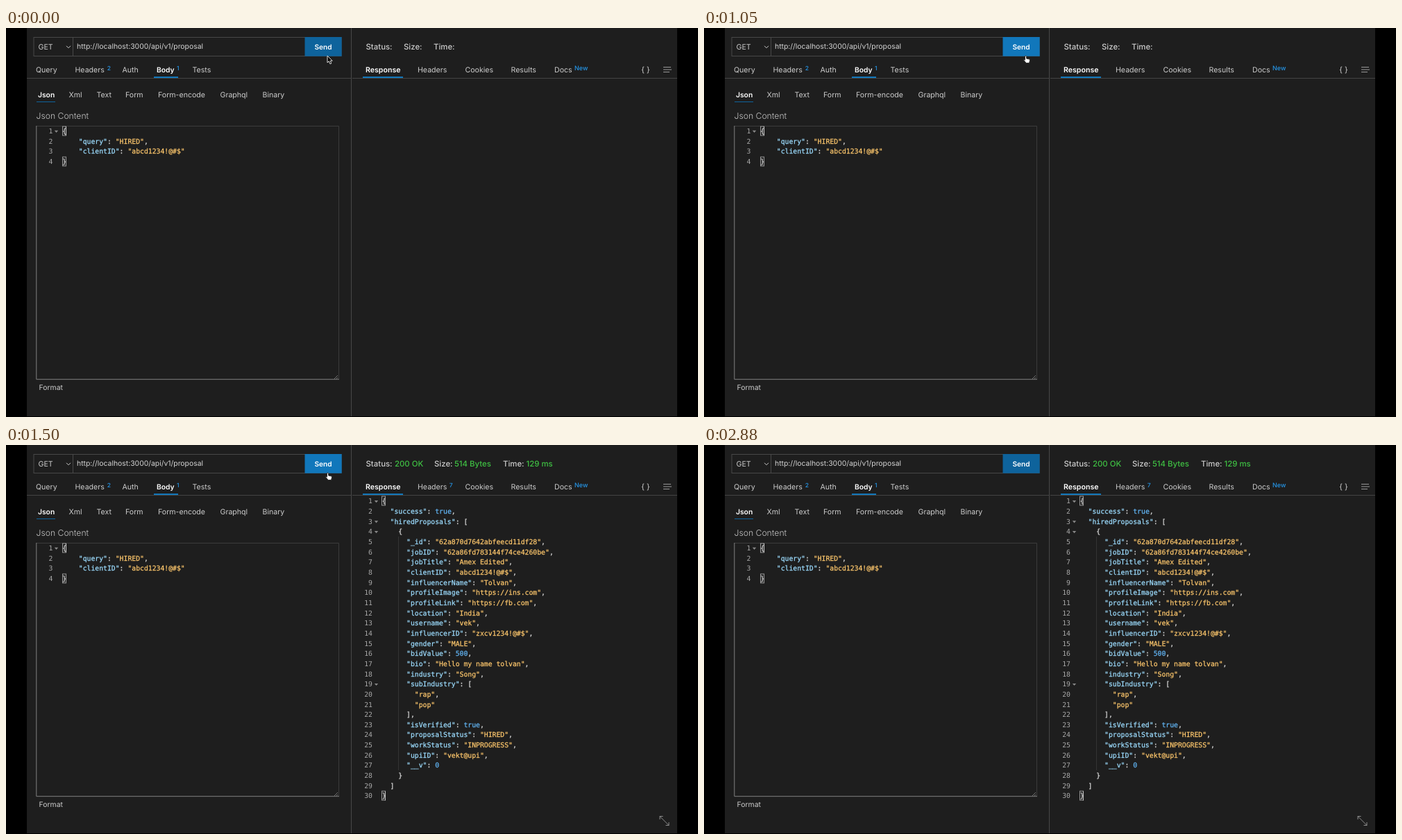
These frames come from a looping animation (997x561 px, 3.33 s). An HTML page with a canvas:

```html
<!DOCTYPE html>
<html lang="en">
<head>
<meta charset="utf-8">
<title>API client</title>
<style>
  html, body { margin: 0; height: 100%; overflow: hidden; background: #000; }
  canvas { display: block; }
</style>
</head>
<body>
<canvas id="stage" width="997" height="561"></canvas>
<script>
const ctx = document.getElementById('stage').getContext('2d');
const LOOP = 3330, HOVER = 810, SEND = 1080, REPLY = 1230, MATCH = 1290, LEAVE = 2520, GONE = 2850;
const CHAR = 5.88, ROW = 14.66;
const INK = '#cccccc', BLUE = '#1177bb', BADGE = '#2596e8', GREEN = '#3fc043';

const requestBody = `{
    "query": "HIRED",
    "clientID": "abcd1234!@#$"
}`.split('\n');

const responseBody = `{
  "success": true,
  "hiredProposals": [
    {
      "_id": "62a870d7642abfeecd11df28",
      "jobID": "62a86fd783144f74ce4260be",
      "jobTitle": "Amex Edited",
      "clientID": "abcd1234!@#$",
      "influencerName": "Tolvan",
      "profileImage": "https://ins.com",
      "profileLink": "https://fb.com",
      "location": "India",
      "username": "vek",
      "influencerID": "zxcv1234!@#$",
      "gender": "MALE",
      "bidValue": 500,
      "bio": "Hello my name tolvan",
      "industry": "Song",
      "subIndustry": [
        "rap",
        "pop"
      ],
      "isVerified": true,
      "proposalStatus": "HIRED",
      "workStatus": "INPROGRESS",
      "upiID": "vekt@upi",
      "__v": 0
    }
  ]
}`.split('\n');

function rect(x, y, w, h, color) {
  ctx.fillStyle = color;
  ctx.fillRect(x, y, w, h);
}

function line(color, width, ...points) {
  ctx.beginPath();
  for (let i = 0; i < points.length; i += 2) ctx.lineTo(points[i], points[i + 1]);
  ctx.strokeStyle = color;
  ctx.lineWidth = width;
  ctx.stroke();
}

// y is the middle of the capital letters
function text(str, x, y, color = INK, size = 10.6, weight = 400, align = 'left') {
  ctx.font = `${weight} ${size}px Inter, sans-serif`;
  ctx.textAlign = align;
  ctx.fillStyle = color;
  ctx.fillText(str, x, y + size * 0.36);
}

function bracketBox(x, y) {
  ctx.strokeStyle = '#999';
  ctx.lineWidth = 1;
  ctx.strokeRect(x + 0.5, y - 6.5, 5, 13);
}

function code(lines, x, y, numberRight, foldX, folds) {
  ctx.font = '9.77px "DejaVu Sans Mono", monospace';
  ctx.lineWidth = 0.25;
  lines.forEach((row, i) => {
    const mid = y + i * ROW, base = mid + 3.5;
    ctx.textAlign = 'right';
    ctx.fillStyle = '#a8a8a8';
    ctx.fillText(i + 1, numberRight, base);
    ctx.textAlign = 'left';
    for (const m of row.matchAll(/"[^"]*"(?=(:)?)|true|\d+|\S/g)) {
      const token = m[0], left = x + m.index * CHAR;
      ctx.fillStyle = ctx.strokeStyle = m[1] ? '#9cdcfe' : token[0] === '"' ? '#fdc76c'
        : /\w/.test(token) ? '#62b6f6' : '#dcdcdc';
      ctx.fillText(token, left, base);
      ctx.strokeText(token, left, base);
    }
    if (folds.includes(i + 1)) {
      ctx.beginPath();
      ctx.moveTo(foldX - 2.7, mid - 0.8);
      ctx.lineTo(foldX + 2.7, mid - 0.8);
      ctx.lineTo(foldX, mid + 2.4);
      ctx.fillStyle = '#888';
      ctx.fill();
    }
  });
}

function shape(path, x, y, fill, stroke) {
  ctx.save();
  ctx.translate(x, y);
  ctx.lineWidth = 1;
  ctx.lineJoin = 'round';
  ctx.fillStyle = fill;
  ctx.strokeStyle = stroke;
  ctx.fill(path);
  ctx.stroke(path);
  ctx.restore();
}

const arrow = new Path2D('M0 0V10L2.3 7.9L3.9 11.8L5.8 11L4.2 7.3H7.2Z');
const hand = new Path2D('M1 0.5Q2.5 -0.5 3 1V4L7 5Q8.3 5.3 8 7L7 10.5H2.7L-0.7 6.5Q-0.8 5.2 1 6.2Z');

function requestPanel(sending, hovered) {
  ctx.lineWidth = 1;
  ctx.strokeStyle = '#484848';
  ctx.strokeRect(40, 13.5, 443, 27);
  line('#484848', 1, 96.5, 13, 96.5, 41);
  text('GET', 46.5, 27);
  line(INK, 1, 87, 25.8, 90, 28.8, 93, 25.8);
  text('http://localhost:3000/api/v1/proposal', 102, 26.3, '#d4d4d4', 10.4);
  rect(430.5, 13, 53.2, 27.7, sending ? '#b8b8b8' : hovered ? BLUE : '#0e639c');
  text('Send', 457, 27, sending ? '#e6e6e6' : '#fff', 10.1, 600, 'center');

  text('Query', 43, 60);
  text('Headers', 99.5, 60);
  text('2', 145.7, 57.5, BADGE, 8.5, 500);
  text('Auth', 167.5, 60);
  text('Body', 217, 60, '#fff', 10.3, 600);
  text('1', 246, 57.5, BADGE, 8.5, 500);
  text('Tests', 268.5, 60);
  rect(213, 70, 35, 2, BLUE);

  text('Json', 46, 96, '#fff', 10.3, 600);
  [['Xml', 90.5], ['Text', 130.5], ['Form', 172], ['Form-encode', 219],
   ['Graphql', 308.5], ['Binary', 369.5]].forEach(([tab, x]) => text(tab, x, 96));
  rect(44, 106, 27, 1, '#0e639c');
  text('Json Content', 43.5, 127, '#c4c4c4', 12.2, 300);

  line('#3c3c3c', 1, 44, 141.5, 479.5, 141.5, 479.5, 506);
  line('#808080', 1, 43.8, 141, 43.8, 506.7, 480, 506.7);
  line('#888', 0.8, 473, 506, 478, 501);
  line('#888', 0.8, 476, 506, 478, 504);
  code(requestBody, 81.3, 148.6, 67.5, 72.5, [1]);
  bracketBox(81, 148.5);
  bracketBox(81, 148.5 + 3 * ROW);
  rect(86, 142, 1, 13, '#d0d0d0');
  text('Format', 47.5, 518, INK, 10.4);
}

function responsePanel(sending, replied, matched, time) {
  if (sending) {
    text('Processing, Please Wait...', 518.5, 27, INK, 11.4, 500);
  } else {
    const columns = replied
      ? [['Status:', 518.5, '200 OK', 560], ['Size:', 617, '514 Bytes', 646], ['Time:', 716, '129 ms', 749.5]]
      : [['Status:', 518.5], ['Size:', 573], ['Time:', 616]];
    for (const [label, x, value, valueX] of columns) {
      text(label, x, 27, INK, 11.4, 500);
      if (value) text(value, valueX, 27, GREEN, 11.4, 500);
    }
  }
  text('Response', 518, 60, '#fff', 10.6, 600);
  text('Headers', 593, 60);
  if (replied) text('7', 638.7, 57.5, BADGE, 8.5, 500);
  text('Cookies', 661.5, 60);
  text('Results', 727.5, 60);
  text('Docs', 790, 60);
  text('New', 819, 58, BADGE, 9, 500);
  rect(514, 70, 58, 2, BLUE);
  text('{ }', 921.5, 60, INK, 11, 400, 'center');
  line('#999', 1, 947, 56.5, 958, 56.5);
  line('#999', 1, 947, 60, 959, 60);
  line('#999', 1, 947, 63.5, 956, 63.5);

  if (sending) {
    const start = Math.PI + (time - 1200) / 1000 * 2 * Math.PI;
    ctx.lineWidth = 2.5;
    for (const [from, sweep, color] of [[0, 2, '#3a3a3a'], [start, 0.5, '#1272b4']]) {
      ctx.beginPath();
      ctx.arc(732.7, 276.3, 12.5, from, from + sweep * Math.PI);
      ctx.strokeStyle = color;
      ctx.stroke();
    }
    text('Processing...', 732.5, 306, '#969696', 10.4, 400, 'center');
    text('Cancel Request', 732.5, 520.5, '#868686', 10.4, 400, 'center');
  }
  if (replied) {
    rect(565, 132, 1, 337, '#343434');
    code(responseBody, 541.8, 80.8, 528, 533.5, [1, 3, 4, 19]);
    if (matched) {
      bracketBox(541, 80.5);
      bracketBox(541, 80.5 + 29 * ROW);
    }
    rect(546, 499.5, 1, 13, '#c8c8c8');
    line('#999', 0.9, 942, 535.5, 955, 548.5);
    line('#999', 0.9, 942, 540, 942, 535.5, 946.5, 535.5);
    line('#999', 0.9, 955, 544, 955, 548.5, 950.5, 548.5);
  }
}

function pointerAt(time) {
  const p = Math.min(1, Math.max(0, (time - LEAVE) / (GONE - LEAVE)));
  const s = p * p * (3 - 2 * p), r = 1 - s;
  return [r * r * 463 + 2 * r * s * 520 + s * s * 657,
          r * r * 40 - 2 * r * s * 60 + s * s * 385];
}

function draw(time) {
  const sending = time >= SEND && time < REPLY;
  const replied = time >= REPLY;
  const [x, y] = pointerAt(time);
  const hovered = time >= HOVER && x < 484;

  rect(0, 0, 997, 561, '#000');
  rect(30, 0, 937, 560, '#1e1e1e');
  line('#444', 1, 30, 72.5, 497, 72.5);
  line('#444', 1, 499, 72.5, 967, 72.5);
  line('#484848', 1, 497.5, 0, 497.5, 560);
  requestPanel(sending, hovered);
  responsePanel(sending, replied, time >= MATCH, time);

  // the pointer is not drawn over the response text
  if (hovered) shape(hand, x - 1.5, y, '#fff', '#333');
  else if (y < 73) shape(arrow, x, y, '#000', '#ddd');
}

ctx.textRendering = 'geometricPrecision';
function tick() {
  draw(performance.now() % LOOP);
  requestAnimationFrame(tick);
}
tick();
</script>
</body>
</html>
```
